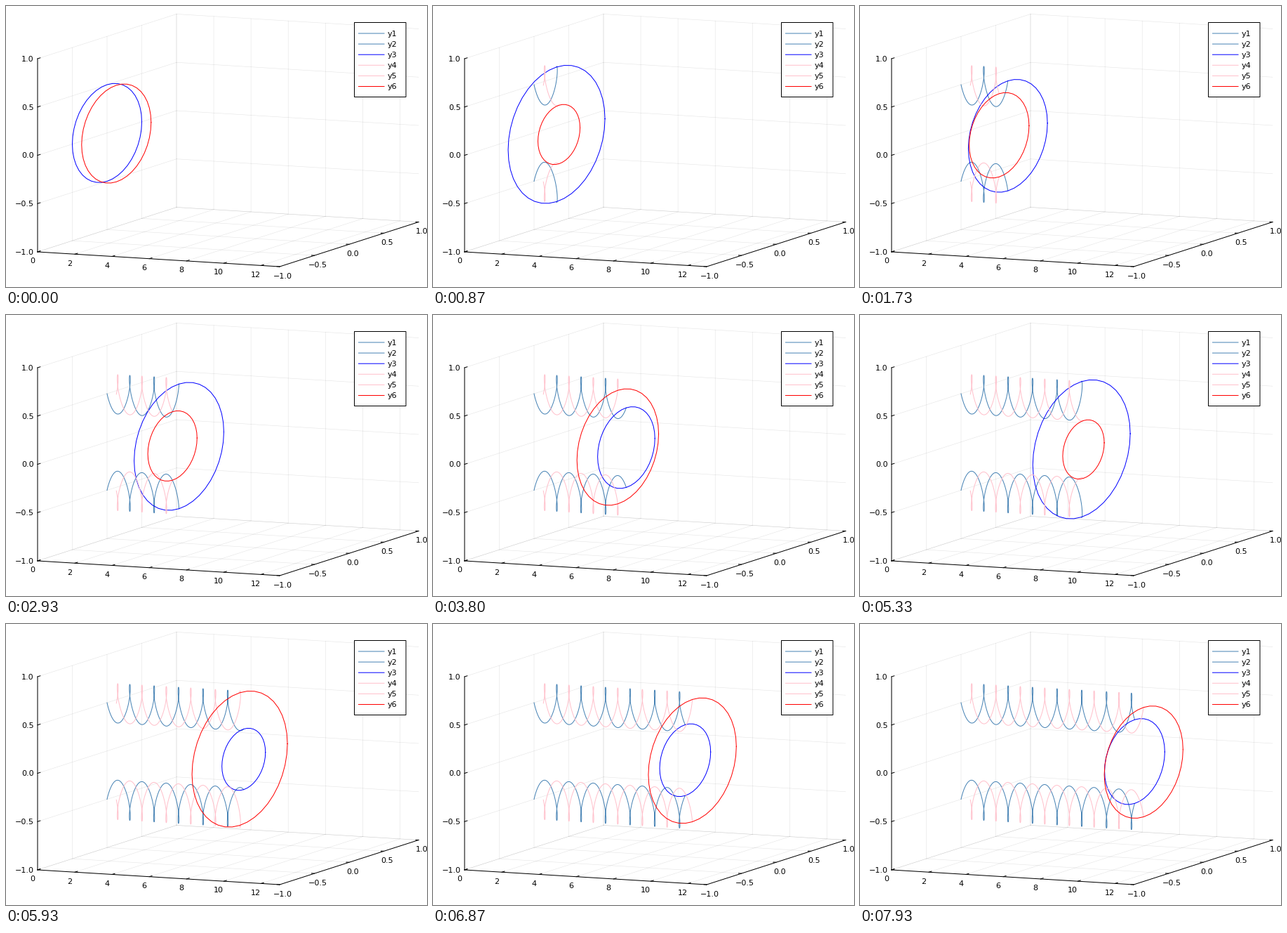
Animation of 600x400 px, one loop 8000 ms. Source, as a matplotlib script:

```python
import numpy as np
import matplotlib.pyplot as plt
from matplotlib.animation import FuncAnimation
from matplotlib.patches import Rectangle

W, H, DPI = 600, 400, 100
LOOP_MS, TICK_MS, POSES = 8000, 20, 120
DT, STEPS, KEEP = 0.0005, 500, 10      # Euler step, steps per pose, steps per stored point
PX = 72 / DPI                          # one pixel in points
FONT = dict(family="DejaVu Sans", size=8, color="black")


def project(x, y, z):
    """Orthographic view of the box x 0..13, y -1..1, z -1..1 in stage pixels."""
    x, y, z = np.broadcast_arrays(x, y, z)
    px = 45 + 345 / 13 * x + 99 * (y + 1)
    py = 350 + 21 / 13 * x - 31.75 * (y + 1) - 137.5 * (z + 1)
    return px, py


def leapfrog():
    """Two vortex pairs of unit strength: rows of x1, h1, x2, h2."""
    k = DT / (2 * np.pi)
    xa, ha, xb, hb = 0.0, 0.5, 0.5, 0.5
    rows = [(xa, ha, xb, hb)]
    for i in range(1, (POSES - 1) * STEPS + 1):
        d, e, s = xb - xa, hb - ha, ha + hb
        near, far = d * d + e * e, d * d + s * s
        dh = k * d * (1 / near - 1 / far)
        xa += k * (0.5 / ha + e / near + s / far)
        xb += k * (0.5 / hb - e / near + s / far)
        ha -= dh
        hb += dh
        if i % KEEP == 0:
            rows.append((xa, ha, xb, hb))
    return np.array(rows)


fig = plt.figure(figsize=(W / DPI, H / DPI), dpi=DPI, facecolor="white")
ax = fig.add_axes([0, 0, 1, 1])
ax.set_xlim(0, W)
ax.set_ylim(H, 0)
ax.axis("off")


def stroke(xs, ys, **style):
    return ax.plot(xs, ys, snap=False, **style)[0]


def segment(a, b, **style):
    (x0, y0), (x1, y1) = project(*a), project(*b)
    stroke([x0, x1], [y0, y1], **style)


def label(x, y, text, ha="center"):
    ax.text(x, y + 4, text, ha=ha, va="baseline", zorder=8, **FONT)


def tick(point, step):
    x, y = project(*point)
    stroke([x, x + step[0]], [y, y + step[1]], color="black", lw=PX, zorder=2)
    return x, y


def number(v):
    return f"{v:.1f}".replace("-", "\u2212")


def draw_box():
    grid = dict(color="black", alpha=0.1, lw=0.6 * PX, zorder=1)
    axis = dict(color="black", lw=PX, zorder=2, solid_capstyle="projecting")
    halves = np.arange(-1, 1.1, 0.5)

    for x in range(0, 13, 2):
        segment((x, -1, -1), (x, 1, -1), **grid)
        segment((x, 1, -1), (x, 1, 1), **grid)
        tx, ty = tick((x, -1, -1), (3.8, -1.2))
        label(tx - 7.2, ty + 12.3, str(x))
    for y in halves:
        segment((0, y, -1), (13, y, -1), **grid)
        segment((0, y, -1), (0, y, 1), **grid)
        tx, ty = tick((13, y, -1), (-4, -0.25))
        label(tx + 4.8, ty + 12.5, number(y))
    for z in halves:
        segment((0, -1, z), (0, 1, z), **grid)
        segment((0, 1, z), (13, 1, z), **grid)
        tx, ty = tick((0, -1, z), (3.8, -1.2))
        label(tx - 5.3, ty, number(z), "right")

    segment((0, -1, -1), (0, -1, 1), **axis)
    segment((0, -1, -1), (13, -1, -1), **axis)
    segment((13, -1, -1), (13, 1, -1), **axis)


COLORS = ["steelblue", "steelblue", "blue", "pink", "pink", "red"]


def draw_legend():
    ax.add_patch(Rectangle((496.5, 23.5), 73.5, 106, fc="white", ec="black",
                           lw=PX, zorder=6, snap=False))
    for i, color in enumerate(COLORS):
        y = 39 + 15.1 * i
        stroke([502.5, 539], [y, y], color=color, lw=PX, zorder=7)
        label(544, y, f"y{i + 1}", "left")


draw_box()
draw_legend()
lines = [stroke([], [], color=c, lw=PX, zorder=3 + 0.1 * i)
         for i, c in enumerate(COLORS)]
path = leapfrog()
angle = np.linspace(0, 2 * np.pi, 41)


def update(frame):
    # poses last 60 or 70 ms, so they start on the nearest clock tick
    pose = (frame * TICK_MS + 15) * POSES // LOOP_MS
    n = pose * STEPS // KEEP + 1
    for group, col in ((lines[:3], 0), (lines[3:], 2)):
        x, h = path[:n, col], path[:n, col + 1]
        top, bottom, ring = group
        top.set_data(*project(x, 0, h))
        bottom.set_data(*project(x, 0, -h))
        ring.set_data(*project(x[-1], h[-1] * np.cos(angle), h[-1] * np.sin(angle)))
    return lines


anim = FuncAnimation(fig, update, frames=LOOP_MS // TICK_MS, interval=TICK_MS,
                     init_func=lambda: update(0), repeat=True, repeat_delay=0)
plt.show()
```
